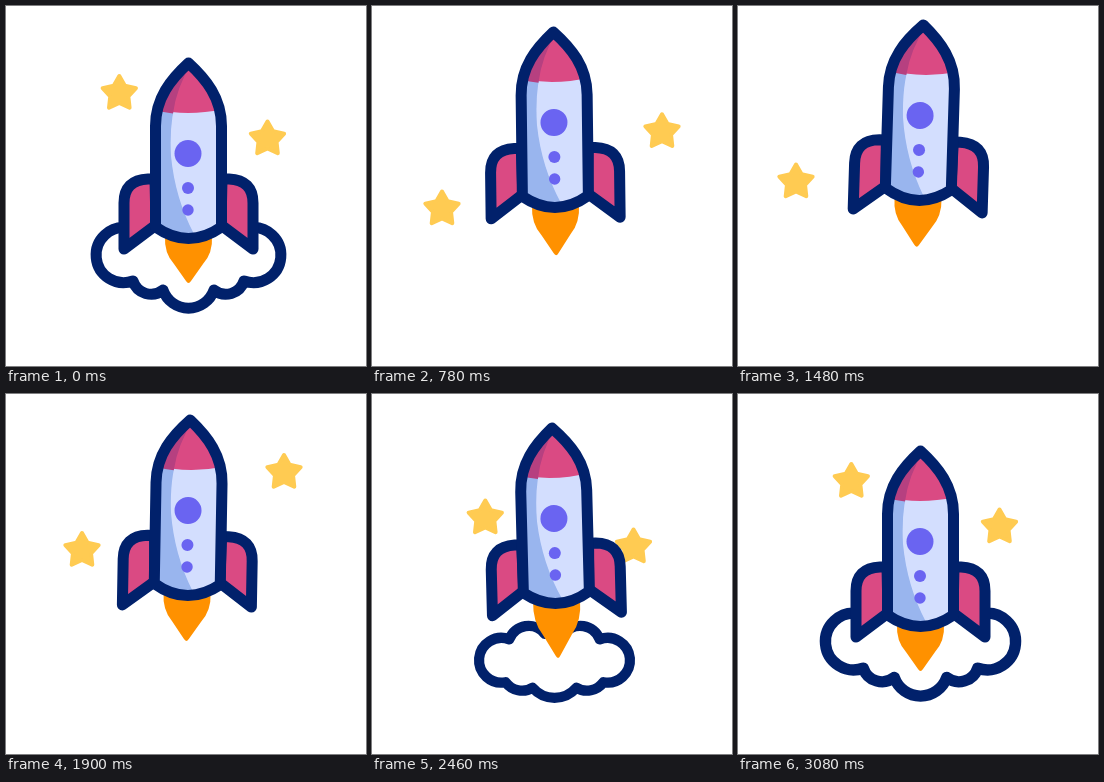
Animation, 360 px wide and 360 px high, one loop 3100 ms. Source, as an HTML page:

```html
<!DOCTYPE html>
<html lang="en">
<head>
<meta charset="utf-8">
<title>Rocket</title>
<style>
  html, body { margin: 0; width: 100%; height: 100%; overflow: hidden; background: #fff; }
  svg { display: block; width: 100vw; height: 100vh; }
  .line { stroke: #01216b; stroke-width: 11; stroke-linejoin: round; stroke-linecap: round; }
</style>
</head>
<body>
<svg viewBox="0 0 360 360">
  <defs>
    <path id="hull" d="M182.5 57C165 73 149.5 92 149.5 120V221Q182.5 244 215.5 221V120C215.5 92 200 73 182.5 57Z"/>
    <path id="wing" d="M149 173H142Q118 174 118 197V243L150 219Z"/>
    <clipPath id="inside"><use href="#hull"/></clipPath>
  </defs>
  <g id="stars" fill="#ffcb52" stroke="#ffcb52" stroke-width="4" stroke-linejoin="round"></g>
  <path id="cloud" class="line" fill="#fff"/>
  <g id="rocket">
    <path id="flame" fill="#ff9100" d="M159 230Q158 247 168 258L180 275Q182.5 279 185 275L197 258Q207 247 206 230Z"/>
    <g class="line" fill="#da4a83">
      <use href="#wing"/>
      <use href="#wing" transform="translate(365 0) scale(-1 1)"/>
    </g>
    <g clip-path="url(#inside)">
      <path fill="#d3defe" d="M140 50H225V245H140Z"/>
      <path fill="#99b5ee" d="M140 90H172Q163 112 165 150Q169 192 188 228V245H140Z"/>
      <path fill="#da4a83" d="M140 50H225V101Q182 113 140 101Z"/>
      <path fill="#b64080" d="M140 50H190Q171 78 167 107.5Q153 106 140 101Z"/>
    </g>
    <use href="#hull" class="line" fill="none"/>
    <g fill="#6a64f1">
      <circle cx="182" cy="147.5" r="13.5"/>
      <circle cx="182" cy="182" r="6"/>
      <circle cx="182" cy="204" r="5.7"/>
    </g>
  </g>
</svg>
<script>
const LOOP = 3100;
const $ = id => document.getElementById(id);
const clamp = v => Math.max(0, Math.min(1, v));

// Smooth monotone curve through [time, value] keys.
function curve(...keys) {
  const slope = i => (keys[i + 1][1] - keys[i][1]) / (keys[i + 1][0] - keys[i][0]);
  const tangents = keys.map((_, i) => {
    if (i === 0 || i === keys.length - 1) return 0;
    const a = slope(i - 1), b = slope(i);
    return a * b > 0 ? 2 * a * b / (a + b) : 0;
  });
  return t => {
    let i = 0;
    while (i < keys.length - 2 && t >= keys[i + 1][0]) i++;
    const [t0, v0] = keys[i], [t1, v1] = keys[i + 1];
    const h = t1 - t0, u = clamp((t - t0) / h), w = 1 - u;
    return v0 * w * w * (1 + 2 * u) + v1 * u * u * (3 - 2 * u)
      + h * u * w * (tangents[i] * w - tangents[i + 1] * u);
  };
}

const lift = curve([0, 0], [120, 0], [380, -22], [780, -31], [1480, -38],
  [1900, -31], [2460, -23], [2800, 0], [LOOP, 0]);
const tilt = curve([0, 0], [120, 0], [380, -0.2], [780, -0.7], [1480, 1.75],
  [1900, 1], [2460, -1.5], [2800, 0], [LOOP, 0]);
const thrust = curve([0, 1], [120, 1], [380, 0.76], [780, 1.07], [1480, 1.04],
  [1900, 1.02], [2460, 1.22], [2800, 1], [LOOP, 1]);
const puff = curve([0, 1], [120, 1], [200, 1.12], [380, 1], [600, 0],
  [2270, 0], [2460, 0.93], [2800, 1.13], [3080, 1.03], [LOOP, 1]);
const swell = curve([0, 1], [160, 1], [380, 0], [2460, 0], [2800, 1], [LOOP, 1]);

// Half the cloud outline; s goes from flat (0) to full (1).
function cloudPath(s) {
  const mix = (a, b) => a + (b - a) * s;
  const points = [
    [mix(172, 172), mix(235, 205)],
    [mix(134, 122), mix(241, 222)],
    [mix(130, 127), mix(287, 275)],
    [mix(159, 157), mix(293, 284)]
  ];
  const mirror = ([x, y]) => [365 - x, y];
  const arc = (r, large, sweep, p) => `A${r} ${r} 0 ${large} ${sweep} ${p}`;
  const [top, side, low, base] = points;
  const [top2, side2, low2, base2] = points.map(mirror);
  const bump = mix(22, 27), lobe = mix(24, 27.5), small = mix(22, 19), belly = mix(31, 27);
  return `M${top}` + arc(bump, 0, 0, side) + arc(lobe, 1, 0, low) + arc(small, 0, 0, base)
    + arc(belly, 0, 0, base2) + arc(small, 0, 0, low2) + arc(lobe, 1, 0, side2)
    + arc(bump, 0, 0, top2) + 'Z';
}

const starPoints = Array.from({ length: 10 }, (_, i) => {
  const r = i % 2 ? 9.5 : 17.5, a = i * Math.PI / 5;
  return [r * Math.sin(a), -r * Math.cos(a)].map(v => v.toFixed(2));
}).join(' ');

function makeStar() {
  const star = document.createElementNS('http://www.w3.org/2000/svg', 'polygon');
  star.setAttribute('points', starPoints);
  $('stars').append(star);
  return star;
}

function placeStar(star, x, y, opacity) {
  star.setAttribute('transform', `translate(${x} ${y})`);
  star.setAttribute('opacity', opacity);
}

const TOP = 26, BOTTOM = 236, SPEED = 0.75;
const fade = y => clamp((y - TOP + 4) / 16) * clamp((BOTTOM - y) / 16);

// Stars that rush past: column and start time.
const passing = [[70, 545], [290, 648], [86, 915], [281, 1080], [58, 1281],
  [313, 1550], [76, 1727], [278, 1831], [67, 1985]]
  .map(([x, start]) => ({ x, start, star: makeStar() }));

// Stars that rest beside the rocket, drop at launch and come back.
const resting = [
  { x: 113.3, home: 87.5, drop: 300, enter: 2310, dip: 124 },
  { x: 261.5, home: 133, drop: 390, enter: 2280, dip: 153 }
].map(s => ({
  ...s, star: makeStar(),
  back: curve([s.enter, 30], [2460, s.dip], [2770, s.home], [LOOP, s.home])
}));

function draw(t) {
  $('rocket').setAttribute('transform', `translate(0 ${lift(t)}) rotate(${tilt(t)} 182.5 150)`);
  $('flame').setAttribute('transform', `translate(0 232) scale(1 ${thrust(t)}) translate(0 -232)`);

  const size = puff(t);
  $('cloud').setAttribute('visibility', size > 0.01 ? 'visible' : 'hidden');
  $('cloud').setAttribute('d', cloudPath(swell(t)));
  $('cloud').setAttribute('transform', `translate(182.5 304) scale(${size}) translate(-182.5 -304)`);

  for (const { x, start, star } of passing) {
    const y = TOP + (t - start) * SPEED;
    placeStar(star, x, y, t < start ? 0 : fade(y));
  }
  for (const { x, home, drop, enter, back, star } of resting) {
    const returning = t >= enter;
    const y = returning ? back(t) : home + 20 * (Math.max(0, t - drop) / 80) ** 2;
    placeStar(star, x, y, fade(y));
  }
}

const begin = performance.now();
function tick() {
  draw((performance.now() - begin) % LOOP);
  requestAnimationFrame(tick);
}
draw(0);
requestAnimationFrame(tick);
</script>
</body>
</html>
```
